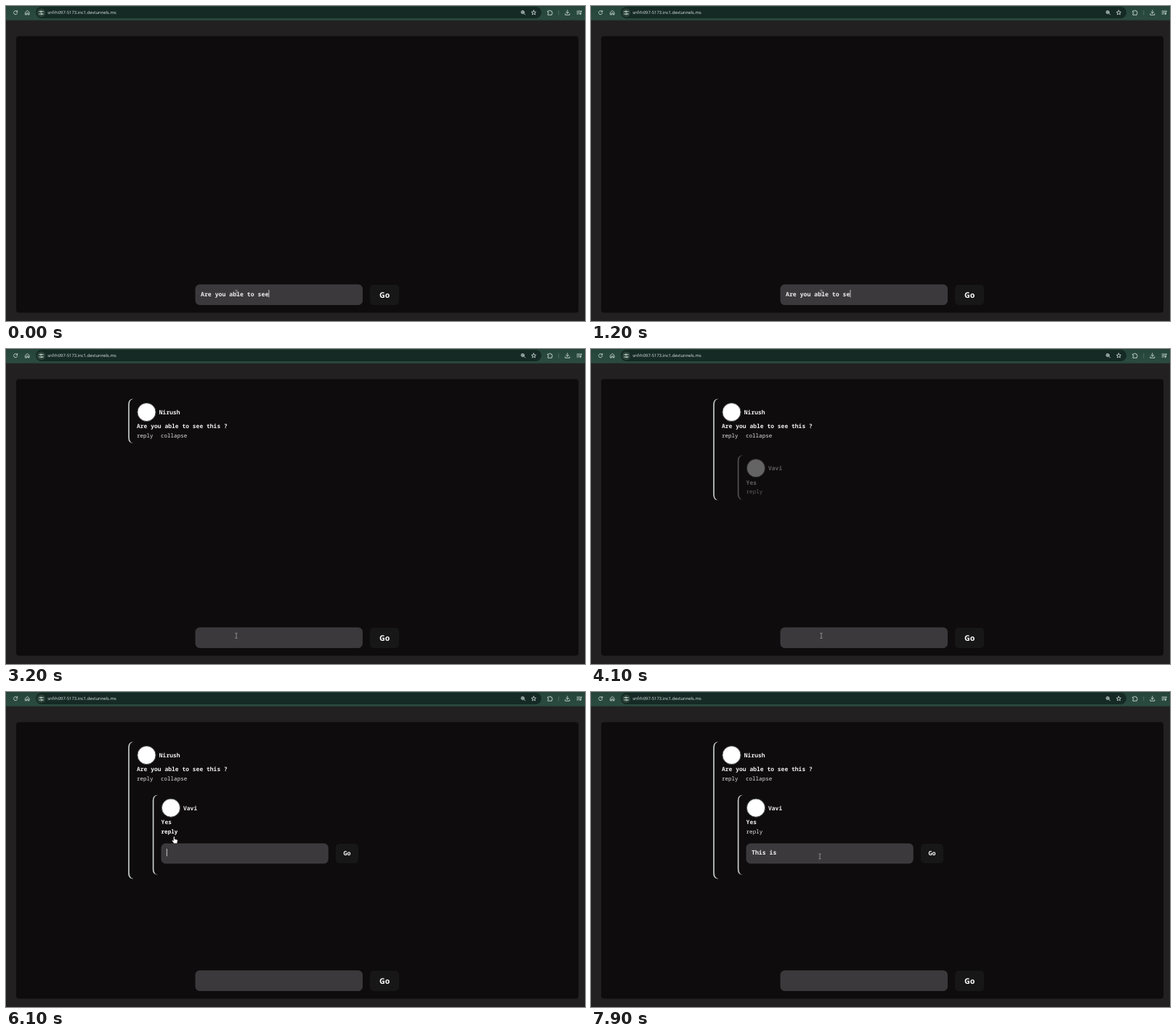
Recreate the animation shown at these times as an HTML page. Size 797 by 434 pixels, loop 8 s.

```html
<!DOCTYPE html>
<html lang="en">
<head>
<meta charset="utf-8">
<title>Comment thread</title>
<style>
html, body { margin: 0; width: 100%; height: 100%; overflow: hidden; background: #222021; }
svg { display: block; }
text { font: 600 8px "Noto Sans Mono", monospace; fill: #efefef; white-space: pre; text-rendering: geometricPrecision; }
.typed { font-size: 8.2px; }
.link { font-size: 7.55px; font-weight: 400; fill: #e2e2e2; }
.link.hover { font-weight: 700; fill: #fff; }
.url { font: 400 5.9px "Open Sans", "Noto Sans", sans-serif; fill: #e4ebe8; }
.go { font: 700 10.6px "Noto Sans", sans-serif; fill: #fff; }
.goSmall { font-size: 8.4px; font-weight: 700; fill: #fff; }
.icon { fill: none; stroke: #c9d6d0; stroke-width: .9; stroke-linecap: round; stroke-linejoin: round; }
.field { fill: #3b393b; stroke: #464446; stroke-width: .7; }
.button { fill: #171718; }
.caret { stroke: #eee; stroke-width: .8; }
.rail { fill: #c3cac7; }
</style>
</head>
<body>
<svg width="797" height="434" viewBox="0 0 797 434">
  <defs>
    <linearGradient id="bar" x2="0" y2="1">
      <stop stop-color="#25453a"/><stop offset=".9" stop-color="#2b4b40"/><stop offset="1" stop-color="#263b34"/>
    </linearGradient>
  </defs>
  <rect width="797" height="434" fill="#222021"/>
  <rect width="797" height="20" fill="url(#bar)"/>
  <rect x="41" y="1" width="696" height="16" rx="8" fill="#152a24"/>
  <circle cx="48.5" cy="9.3" r="5.8" fill="#2b433a"/>
  <g class="icon">
    <path d="M15.3 7.6A2.6 2.6 0 1 0 15.7 9.8M15.7 6.3V8.1H13.9"/>
    <path d="M26.8 8.6L29.4 6.4L32 8.6V12H30.3V9.8H28.5V12H26.8Z"/>
    <path d="M45.6 7.7H47.4M49.4 7.7H51.4M45.6 11H47.6M49.7 11H51.4"/>
    <circle cx="48.2" cy="7.7" r=".9"/><circle cx="48.8" cy="11" r=".9"/>
    <circle cx="711.2" cy="8.5" r="2.1"/><path d="M712.8 10.1L714.6 11.9M710.3 8.5H712.1M711.2 7.6V9.4"/>
    <path d="M726.4 6L727.3 8.1L729.5 8.3L727.8 9.7L728.4 11.9L726.4 10.7L724.4 11.9L725 9.7L723.3 8.3L725.5 8.1Z"/>
    <path d="M745.9 7H747.6A1 1 0 0 1 749.6 7H751.3V8.6A1 1 0 0 1 751.3 10.6V12.3H745.9V10.5A1 1 0 0 0 745.9 8.5Z"/>
    <path d="M760.8 6.5V12" stroke="#557167"/>
    <path d="M772.8 5.8V10M770.9 8.3L772.8 10.2L774.7 8.3M769.8 10.7V12.3H775.8V10.7"/>
    <path d="M786 7H790.5M786 9H789.5M786 11H788M791.3 10.6V7H792.6"/><circle cx="790.5" cy="10.8" r=".8"/>
  </g>
  <text class="url" x="57.3" y="11.4">snfrh097-5173.inc1.devtunnels.ms</text>

  <rect x="14" y="41.5" width="774" height="381" rx="4" fill="#0e0c0d"/>

  <g id="parent">
    <path class="rail"/>
    <circle cx="193.5" cy="87" r="12.6" fill="#fff" stroke="#4a4d4d"/>
    <text x="210.8" y="90">Nirush</text>
    <text x="180" y="109.3">Are you able to see this ?</text>
    <text class="link" x="180" y="121.6">reply</text>
    <text class="link" x="213" y="121.6">collapse</text>
  </g>
  <g id="child">
    <path class="rail"/>
    <circle cx="227" cy="159.7" r="12.6" fill="#fff" stroke="#4a4d4d"/>
    <text x="244" y="162.6">Vavi</text>
    <text x="213.6" y="182.2">Yes</text>
    <text class="link" id="reply" x="213.6" y="194.5">reply</text>
  </g>
  <g id="answer">
    <rect class="field" x="214" y="209" width="229.3" height="27" rx="5.5"/>
    <rect class="button" x="454" y="209" width="31" height="27" rx="5"/>
    <text class="goSmall" x="464.6" y="225.3">Go</text>
    <text class="typed" x="221" y="224.3"></text>
    <path class="caret"/>
  </g>
  <g id="compose">
    <rect class="field" x="261" y="384" width="229.5" height="27.5" rx="5.5"/>
    <rect class="button" x="501" y="384" width="40" height="28" rx="5"/>
    <text class="go" x="514" y="402">Go</text>
    <text class="typed" x="268" y="399.5"></text>
    <path class="caret"/>
  </g>

  <g id="mouse">
    <path id="beam" d="M-1.6 -3.5H-.5L0 -3L.5 -3.5H1.6M0 -3V3M-1.6 3.5H-.5L0 3L.5 3.5H1.6" fill="none" stroke="#a5a5a5" stroke-width=".8"/>
    <path id="arrow" d="M0 0V9L2.1 7.1L3.5 10.2L4.8 9.6L3.4 6.6H6.2Z" fill="#fff" stroke="#111" stroke-width=".6"/>
    <path id="hand" d="M-1.6 -4.6Q-.7 -5.6 .2 -4.6V-1.3L3.2 -.7Q4.4 -.4 4.3 .8L3.6 4.8H-.9L-3.4 1.2Q-3.6 0 -2.6 .1L-1.6 1Z" fill="#fff" stroke="#111" stroke-width=".6"/>
  </g>
</svg>
<script>
const LOOP = 8000, STEP = 100, ADVANCE = 4.92;
const $ = q => document.querySelector(q);
const clamp = v => Math.max(0, Math.min(1, v));
const show = (el, on) => el.style.display = on ? "" : "none";

const question = "Are you able to see this ?", reply = "This is";
const track = [ // time, x, y
  [0, 317, 395], [4400, 317, 395], [5000, 435, 394], [5300, 435, 394],
  [5800, 230, 197], [6100, 232, 204], [6300, 232, 204], [6700, 315, 226.5], [LOOP, 315, 226.5]
];

function mouseAt(t) {
  const i = track.findIndex(p => p[0] > t), [a, x, y] = track[i - 1], [b, u, v] = track[i];
  const k = (t - a) / (b - a), e = k * k * (3 - 2 * k);
  return [x + (u - x) * e, y + (v - y) * e];
}

function questionLength(t) {
  if (t < 1100) return 19;
  if (t < 1400) return 18;
  if (t < 2200) return Math.min(25, 19 + (t - 1400) / STEP);
  return t < 2700 ? 26 : 0;
}

const blink = (t, since) => (t - since) % 1060 < 530;

function setField(id, text, caretOn) {
  const label = $(id + " .typed"), caret = $(id + " .caret");
  label.textContent = text;
  const x = +label.getAttribute("x") + text.length * ADVANCE + .4, y = +label.getAttribute("y");
  caret.setAttribute("d", `M${x} ${y - 8.3}V${y + 2}`);
  show(caret, caretOn);
}

// Left border that thins out round its corners
function rail(id, x, top, bottom) {
  $(id + " .rail").setAttribute("d",
    `M${x + 7.5} ${top}Q${x} ${top} ${x} ${top + 8}V${bottom - 8}Q${x} ${bottom} ${x + 7.5} ${bottom}` +
    `Q${x + 1.7} ${bottom - 1} ${x + 1.7} ${bottom - 8}V${top + 8}Q${x + 1.7} ${top + 1} ${x + 7.5} ${top}Z`);
}

function enter(id, t, start) {
  const k = t < start ? 0 : clamp(.36 + (t - start) / 300), el = $(id);
  el.setAttribute("opacity", k);
  el.setAttribute("transform", `translate(0 ${7 * (1 - k)})`);
}

function draw(t) {
  const open = t >= 6000;
  enter("#parent", t, 2900);
  enter("#child", t, 4100);
  rail("#parent", 168.2, 68.5, open ? 257.5 : t >= 4100 ? 208.5 : 130);
  rail("#child", 201.8, 141.7, open ? 252 : 203.2);

  const focus = t < 2400 ? t : t < 5000 ? 2400 : 5000;
  setField("#compose", question.slice(0, questionLength(t)), !open && blink(t, focus));

  show($("#answer"), open);
  const n = Math.max(0, Math.min(reply.length, (t - 6600) / STEP));
  setField("#answer", reply.slice(0, n), blink(t, n ? Math.min(t, 7300) : 6000));

  const [x, y] = mouseAt(t);
  const over = t >= 5800 && t <= 6300;
  const beam = y > 384 || (open && x > 214 && y > 209);
  $("#mouse").setAttribute("transform", `translate(${x} ${y})`);
  show($("#hand"), over);
  show($("#beam"), !over && beam);
  show($("#arrow"), !over && !beam);
  $("#reply").classList.toggle("hover", over);
}

const begin = performance.now();
function tick() {
  const t = (performance.now() - begin) % LOOP;
  draw(Math.floor(t / STEP) * STEP);
  requestAnimationFrame(tick);
}
tick();
</script>
</body>
</html>
```
